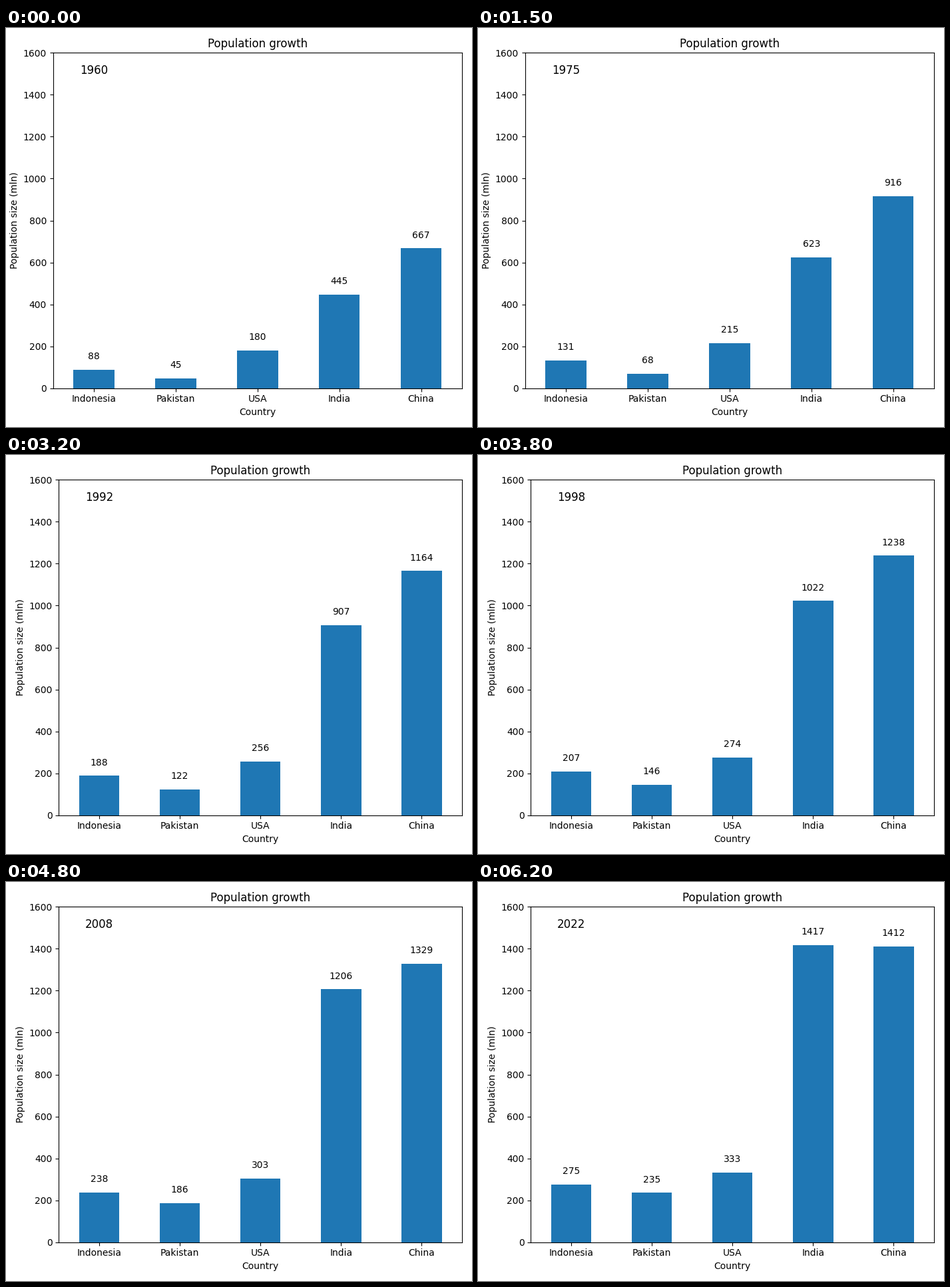
These frames come from a looping animation (700 by 600 pixels, 6300 ms). A matplotlib script:

```python
import numpy as np
import matplotlib.pyplot as plt
from matplotlib.animation import FuncAnimation

START, END = 1960, 2022
TOP = 1600
LABEL_GAP = 50

# Population in millions at a few key years; the rest is interpolated.
KEY_YEARS = np.array([1960, 1962, 1967, 1975, 1983, 1992, 2003, 2014, 2019, 2022])
POPULATION = {
    "Indonesia": [88.3, 93.4, 106.4, 131.8, 158.4, 188.6, 223.1, 256.2, 269.6, 275.5],
    "Pakistan": [45.9, 48.2, 54.9, 68.1, 91.4, 122.4, 166.9, 208.3, 223.3, 235.8],
    "USA": [180.7, 186.5, 198.7, 215.9, 233.8, 256.5, 290.1, 318.4, 328.3, 333.3],
    "India": [445.9, 467.0, 522.0, 623.5, 745.8, 907.6, 1117.4, 1307.2, 1383.1, 1417.2],
    "China": [667.1, 665.8, 754.6, 916.4, 1023.3, 1164.9, 1288.4, 1371.9, 1407.7, 1412.2],
}


def smooth(x, knots, values):
    """Cubic Hermite curve through the given points."""
    values = np.array(values)
    slopes = np.gradient(values, knots, edge_order=2)
    i = np.clip(np.searchsorted(knots, x, side="right") - 1, 0, len(knots) - 2)
    h = knots[i + 1] - knots[i]
    t = (x - knots[i]) / h
    return ((1 + 2 * t) * (1 - t) ** 2 * values[i]
            + t * (1 - t) ** 2 * h * slopes[i]
            + t ** 2 * (3 - 2 * t) * values[i + 1]
            + t ** 2 * (t - 1) * h * slopes[i + 1])


years = np.arange(START, END + 1)
heights = np.array([smooth(years, KEY_YEARS, v) for v in POPULATION.values()]).T
slots = range(len(POPULATION))

fig, ax = plt.subplots(figsize=(7, 6), dpi=100)
bars = ax.bar(slots, heights[0], width=0.5, color="#1f77b4")
ax.set_xticks(slots, list(POPULATION))
ax.set_xlim(-0.5, len(POPULATION) - 0.5)
ax.set_title("Population growth")
ax.set_xlabel("Country")
ax.set_ylabel("Population size (mln)")

year_text = ax.text(0, 1500, "", fontsize=12, ha="center", in_layout=False)
value_texts = [ax.text(x, 0, "", ha="center", in_layout=False) for x in slots]


def update(frame):
    values = heights[frame]
    # Margins follow the tick labels of a y range fitted to the tallest bar.
    ax.set_ylim(0, values.max() * 1.05)
    fig.tight_layout()
    ax.set_ylim(0, TOP)

    year_text.set_text(str(years[frame]))
    for bar, text, value in zip(bars, value_texts, values):
        bar.set_height(value)
        text.set_y(value + LABEL_GAP)
        text.set_text(str(int(value)))
    return [*bars, *value_texts, year_text]


anim = FuncAnimation(fig, update, frames=len(years), interval=100, repeat=True)
plt.show()
```
